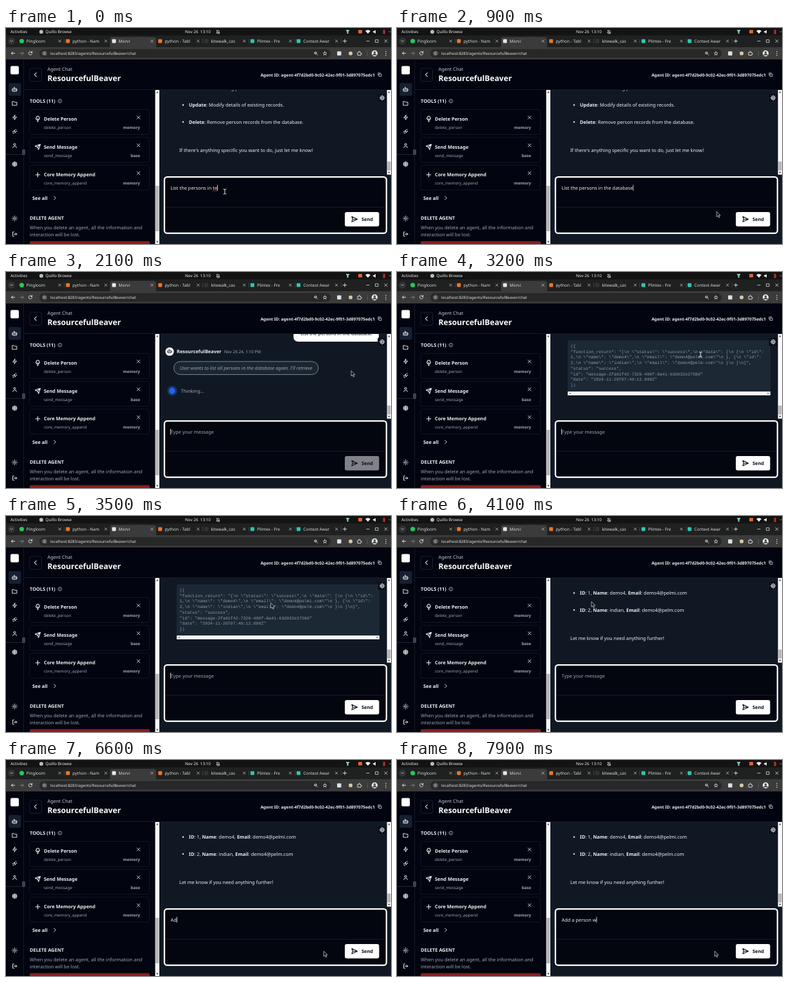
Recreate the animation shown at these times as an HTML page. Size 600 by 338 pixels, loop 8 s.

```html
<!DOCTYPE html>
<html lang="en">
<head>
<meta charset="utf-8">
<title>Agent chat</title>
<style>
html, body { margin: 0; width: 100%; height: 100%; overflow: hidden; background: #02040f; }
svg { display: block; width: 100vw; height: 100vh; }
text { font: 7.43px "Noto Sans", sans-serif; fill: #eceff3; white-space: pre; text-rendering: geometricPrecision; }
.b { font-weight: 700; }
.small { font-size: 6.4px; }
.dim { fill: #a0a7b4; }
.title { font-size: 12.2px; font-weight: 700; fill: #fff; }
.id { font-size: 6.48px; font-weight: 700; }
.end { text-anchor: end; }
.mid { text-anchor: middle; }
.bar { font-size: 6.3px; fill: #f2f2f2; }
.tab { font-size: 6.5px; fill: #dcdcdc; }
.url { font-size: 6.1px; fill: #e3e3e3; }
.code { font: 6.62px "Liberation Mono", monospace; fill: #8d99a8; }
.dark { fill: #0b0f19; }
.italic { font-style: italic; fill: #9aa3b0; }
.icon { fill: none; stroke-linecap: round; stroke-linejoin: round; }
</style>
</head>
<body>
<svg id="stage" viewBox="0 0 600 338"></svg>
<script>
const AGENT = 'ResourcefulBeaver';
const STAMP = 'Nov 26 24, 1:10 PM';

const text = (x, y, str, cls = '', attrs = '') => `<text x="${x}" y="${y}" class="${cls}" ${attrs}>${str}</text>`;
const rect = (x, y, w, h, fill, r = 0, stroke = 'none', sw = .6) =>
  `<rect x="${x}" y="${y}" width="${w}" height="${h}" rx="${r}" fill="${fill}" stroke="${stroke}" stroke-width="${sw}"/>`;
const circle = (x, y, r, fill, attrs = '') => `<circle cx="${x}" cy="${y}" r="${r}" fill="${fill}" ${attrs}/>`;

const ring = (cx, cy, r) => `M${cx - r} ${cy}a${r} ${r} 0 1 0 ${2 * r} 0a${r} ${r} 0 1 0 ${-2 * r} 0`;
const rays = (inner, outer) => [...Array(8)].map((_, i) => {
  const c = Math.cos(i * Math.PI / 4), s = Math.sin(i * Math.PI / 4);
  return `M${12 + inner * c} ${12 + inner * s}L${12 + outer * c} ${12 + outer * s}`;
}).join('');
const ICONS = {
  close: 'M5 5L19 19M19 5L5 19',
  right: 'M9 5L16 12L9 19',
  left: 'M15 5L8 12L15 19',
  down: 'M6 9L12 15L18 9',
  plus: 'M12 4V20M4 12H20',
  minus: 'M5 12H19',
  box: 'M5 5H19V19H5Z',
  bell: 'M4 18H20L18 15V10A6 6 0 0 0 6 10V15ZM10 22H14M4 3L20 21',
  bot: 'M4 9H20V20H4ZM12 9V4H8M1 14H4M20 14H23M9 13V16M15 13V16',
  folder: 'M3 4H9L12 7H21V20H3Z',
  zap: 'M13 2L4 14H12L11 22L20 10H12Z',
  flow: 'M3 13H8L11 6L14 18L17 11H21M15 4L19 4M5 19H9',
  user: ring(12, 7, 4) + 'M5 21V19A4 4 0 0 1 9 15H15A4 4 0 0 1 19 19V21',
  gear: ring(12, 12, 7) + ring(12, 12, 3) + rays(8, 11),
  wheel: ring(12, 12, 9) + ring(12, 12, 3) + rays(3, 9),
  sun: ring(12, 12, 4) + rays(8, 10.5),
  exit: 'M9 3H4V21H9M9 12H21M16 7L21 12L16 17',
  cone: 'M8 12L12 22L16 12ZM6 12A4 4 0 0 1 7 6A5 5 0 0 1 17 6A4 4 0 0 1 18 12Z',
  plane: 'M3 3L22 12L3 21L6 12ZM6 12H22',
  kite: 'M22 2L15 22L11 13L2 9ZM22 2L11 13',
  info: ring(12, 12, 10) + 'M12 11V17M12 7V7.5',
  copy: 'M9 9H21V21H9ZM5 15H3V3H15V5',
  back: 'M20 12H4M11 5L4 12L11 19',
  forward: 'M4 12H20M13 5L20 12L13 19',
  reload: 'M19 8A8 8 0 1 0 20 13M20 3V9H14',
  zoom: ring(10, 10, 6) + 'M15 15L21 21M7 10H13',
  star: 'M12 3L15 9L21 10L16.5 14L18 21L12 17L6 21L7.5 14L3 10L9 9Z',
  puzzle: 'M4 8H9V5A2 2 0 0 1 13 5V8H18V13H20A2 2 0 0 1 20 17H18V21H4Z'
};
// Icons are drawn on a 24 unit grid, centred on x, y.
const glyph = (name, x, y, size = 9, color = '#f1f3f6') =>
  `<path class="icon" d="${ICONS[name]}" stroke="${color}" stroke-width="2.5" transform="translate(${x - size / 2} ${y - size / 2}) scale(${size / 24})"/>`;

function topBar() {
  return rect(0, 0, 600, 12, '#131313') +
    text(7, 8.2, 'Activities', 'bar') + circle(55, 6, 3, '#b9bcc0') + text(61.5, 8.2, 'Quillo Browse', 'bar') +
    text(299, 8.2, 'Nov 26  13:10', 'bar mid') + glyph('bell', 330.5, 6, 7) +
    '<path d="M529.5 3H535.5L533.5 6V9H531.5V6Z" fill="#8fd0c4"/>' + rect(549, 3, 6, 5.5, '#d9653b', 1) +
    '<path d="M560 4.5Q564 1.5 568 4.5L564 9Z M572 5H573.5L576 3V9L573.5 7H572Z" fill="#eee"/>' +
    rect(587.5, 2.8, 3.4, 6.6, '#b3282d', .6) + glyph('down', 598, 6, 5);
}

function browser() {
  const tabs = [
    ['Pingloom', '#25c55f'], ['python - Nam', '#e8772e'], ['Morvi', '#e8e8e8'], ['python - Tabl', '#e8772e'],
    ['kitewalk_cas', '#303235'], ['Plintex - Fre', '#2cc7ae'], ['Context Awar', '#2cc7ae']
  ];
  return rect(0, 11.5, 600, 19, '#1f2020') + rect(0, 30, 600, 19.5, '#3b3b3b') +
    circle(8.5, 20.5, 5.5, '#323334') + glyph('down', 8.5, 20.5, 7) +
    rect(162, 14, 72, 18, '#3b3b3b', 4) +
    tabs.map(([name, color], i) => {
      const x = 24.5 + i * 71.9;
      const mark = i == 0 || i == 4 ? circle(x, 20.5, 3.6, color) : rect(x - 3, 17.5, 6, 6, color, 1);
      return mark + text(x + 7.3, 22.8, name, 'tab') + glyph('close', x + 59.2, 20.5, 6) +
        (i == 1 || i == 2 ? '' : rect(x + 66, 17, .6, 7, '#55585a'));
    }).join('') +
    glyph('plus', 528, 20.5, 8) + glyph('minus', 564, 20.5, 7) + glyph('box', 578, 20.5, 7) + glyph('close', 592, 20.5, 7) +
    glyph('back', 11, 39.5, 8) + glyph('forward', 24.5, 39.5, 8, '#8a8a8a') + glyph('reload', 38, 39.5, 8) +
    rect(52, 33, 454, 13.5, '#282828', 6.7) + circle(60, 39.7, 4.7, '#3c3c3c') + glyph('info', 60, 39.7, 5.5) +
    text(69, 41.8, `localhost:8283/agents/${AGENT}/chat`, 'url') +
    glyph('zoom', 483, 39.7, 7) + glyph('star', 497, 39.7, 7) +
    rect(516, 36.5, 6.5, 6.5, '#dcdfe3', 1) + circle(537, 39.7, 3, '#d8c6a8') + glyph('puzzle', 551, 39.5, 8) +
    rect(563, 36, .6, 8, '#66696c') + circle(574.5, 39.7, 4.7, '#e8eaec') +
    '<path d="M571 42.8A3.6 3.6 0 0 1 578 42.8ZM572.7 38.2a1.8 1.8 0 1 0 3.6 0a1.8 1.8 0 1 0 -3.6 0" fill="#4a4d52"/>' +
    [-3, 0, 3].map(d => circle(592, 39.7 + d, .8, '#e3e3e3')).join('');
}

function sidebar() {
  const items = [['bot', 96], ['folder', 118], ['zap', 140], ['flow', 162], ['user', 184], ['wheel', 213], ['sun', 298], ['exit', 322.5]];
  return rect(0, 49.5, 600, 289, '#02040f') + rect(4, 86, 19.5, 20, '#172030', 3) +
    rect(27.3, 49.5, .7, 289, '#1c2433') + rect(0, 197.5, 27.5, .8, '#2a3342') + rect(7, 59.5, 13, 13, '#fff', 2) +
    items.map(([name, y]) => glyph(name, 13.5, y, 9)).join('') +
    rect(25, 190, 5, 8.5, '#3b4453', 1.2);
}

function header() {
  return rect(37, 63, 18.5, 20.5, 'none', 3, '#2a3445') + glyph('left', 46, 73, 10) +
    text(64.5, 67, 'Agent Chat', '', 'style="fill:#c3c8d0"') + text(64.5, 83, AGENT, 'title') +
    text(575, 75.5, 'Agent ID: agent-4f7d2bd0-9c02-42ec-9f01-3d897075edc1', 'id end') + glyph('copy', 582.5, 73, 7) +
    rect(28, 96.3, 572, .7, '#1c2433');
}

function scrollbar(x, w, bottom, thumbTop, thumbBottom) {
  const c = x + w / 2;
  return rect(x, 97, w, bottom - 97, '#fafafa') + rect(x + .5, thumbTop, w - 1, thumbBottom - thumbTop, '#b8b8b8') +
    `<path d="M${c} 99l1.7 2.5h-3.4zM${c} ${bottom - 2}l1.7 -2.5h-3.4z" fill="#444"/>`;
}

function toolPanel() {
  const tools = [['cone', 'Delete Person', 'delete_person', 'memory'], ['kite', 'Send Message', 'send_message', 'base'],
    ['plus', 'Core Memory Append', 'core_memory_append', 'memory']];
  return text(37, 116.8, 'TOOLS (11)', 'b') + glyph('info', 84, 114.2, 7, '#b9c0ca') +
    tools.map(([mark, name, code, kind], i) => `<g transform="translate(0 ${i * 43.6})">` +
      rect(37, 127.5, 186.5, 39, 'none', 3, '#1d2534') + glyph(mark, 49.5, 142.5, 10) + text(59, 145.2, name, 'b') +
      text(59, 158, code, 'small dim') + text(209, 158, kind, 'small b dim end') + glyph('close', 206.5, 140, 8) + '</g>').join('') +
    text(41, 269, 'See all', 'b') + glyph('right', 76, 266, 9) +
    text(37, 299.5, 'DELETE AGENT', 'b') +
    text(37, 315, 'When you delete an agent, all the information and', 'dim') +
    text(37, 325.5, 'interaction will be lost.', 'dim') +
    rect(37, 333.5, 187, 8, '#8d1c1c', 2) + scrollbar(232.5, 6.6, 338, 247, 318);
}

const bullet = (y, html) => circle(276, y - 2.5, 1.2, '#eceff3') + text(285, y, html);
const bold = str => `<tspan class="b">${str}</tspan>`;
const person = (y, id, name, email) => bullet(y, `${bold('ID')}: ${id}, ${bold('Name')}: ${name}, ${bold('Email')}: ${email}`);

const resultLines = [
  '({',
  String.raw`"function_return": "{\n \"status\": \"success\",\n \"data\": [\n {\n \"id\":`,
  String.raw`1,\n \"name\": \"demo4\",\n \"email\": \"demo4@pelmi.com\"\n }, {\n \"id\":`,
  String.raw`2,\n \"name\": \"indian\",\n \"email\": \"demo4@pelm.com\"\n }\n ]\n}",`,
  '"status": "success",',
  '"id": "message-2fa61f42-7326-490f-9a41-63d932e2759d"',
  '"date": "2024-11-26T07:40:12.000Z"',
  '})'
];

function chat() {
  return rect(239, 97, 361, 241, '#101923') +
    '<clipPath id="view"><rect x="240" y="97" width="354" height="133"/></clipPath><g clip-path="url(#view)">' +
    '<g id="earlier">' + bullet(96.5, bold('Read') + ': Show existing person records.') +
    bullet(123, bold('Update') + ': Modify details of existing records.') +
    bullet(149.5, bold('Delete') + ': Remove person records from the database.') +
    text(270, 194, "If there's anything specific you want to do, just let me know!") + '</g>' +
    '<g id="sent">' + text(577, 134.5, STAMP, 'small dim end') +
    '<path d="M456 139.5H573Q581 139.5 581 147.5V165H456Q448 165 448 157V147.5Q448 139.5 456 139.5Z" fill="#fff"/>' +
    text(459, 154.6, 'List the persons in the database', 'dark') + '</g>' +
    '<g id="reply">' + circle(255, 124.5, 6.6, '#fff') + glyph('bot', 255, 124, 7.5, '#10151f') +
    text(266, 127.2, AGENT, 'b') + text(340, 127, STAMP, 'small dim') +
    '<rect id="thoughtBox" x="261.5" y="140" height="20.5" rx="10.2" fill="#1b2632" stroke="#aab1bb" stroke-width=".7"/>' +
    text(271, 153.3, '', 'italic', 'id="thought"') + '</g>' +
    '<g id="thinking">' + circle(259, 186, 4.7, '#2563eb', 'id="pulse"') + circle(259, 186, 4.7, '#2563eb') +
    text(272.5, 188.7, 'Thinking...', 'dim') + '</g>' +
    '<g id="result">' + rect(266, 107, 316, 81, '#1d2835', 3) +
    resultLines.map((line, i) => text(270.5, 117.8 + i * 8.75, line, 'code')).join('') +
    rect(266, 187, 316, 6, '#fafafa') +
    '<path d="M268.5 190l2 -1.5v3zM579.5 190l-2 -1.5v3z" fill="#555"/></g>' +
    '<g id="answer">' + person(123, 1, 'demo4', 'demo4@pelmi.com') + person(149.5, 2, 'indian', 'demo4@pelm.com') +
    text(270, 194, 'Let me know if you need anything further!') + '</g></g>' +
    rect(579.5, 102.5, 13.5, 13.5, '#060a14', 2.5, '#1d2635') + glyph('gear', 586.2, 109.3, 9) +
    scrollbar(593.7, 6.3, 229.5, 209, 223);
}

function composer() {
  return rect(246.9, 233.1, 346, 88.1, '#03050f', 4.5, '#fff', 2.3) + rect(248.5, 280.3, 342.5, .7, '#1f2836') +
    text(256.5, 252.6, 'Type your message', 'dim', 'id="placeholder"') + text(256.5, 252.6, '', '', 'id="draft"') +
    '<path id="typo" class="icon" d="M322 255.2l1.2 -.8 1.2 .8 1.2 -.8 1.2 .8 1.2 -.8 1.2 .8" stroke="#e5484d" stroke-width=".7"/>' +
    '<rect id="caret" y="245.5" width=".8" height="9" fill="#fff"/>' +
    '<rect id="send" x="528" y="288" width="53.5" height="22.5" rx="3"/>' +
    glyph('plane', 543, 299.2, 11, '#0b0f19') + text(554, 301.9, 'Send', 'b dark');
}

const pointers =
  '<g id="arrow"><path d="M0 0V8.3L2 6.6L3.3 9.6L4.7 9L3.4 6.1H6Z" fill="#111" stroke="#fff" stroke-width=".6"/></g>' +
  '<g id="beam"><path class="icon" d="M-2 -4Q0 -4 0 -3V3Q0 4 -2 4M2 -4Q0 -4 0 -3M0 3Q0 4 2 4" stroke="#fff" stroke-width=".9"/></g>' +
  '<g id="hand"><path d="M-1.5 -4.5Q-.5 -5 0 -4V-1L3 -.3Q4 0 3.8 1.2L3 4H-1.3L-3.5 .8Q-3.3 -.3 -1.5 1Z" fill="#111" stroke="#fff" stroke-width=".6"/></g>';

document.getElementById('stage').innerHTML =
  topBar() + browser() + sidebar() + header() + toolPanel() + chat() + composer() + pointers;

const $ = id => document.getElementById(id);
const show = (id, on) => { $(id).style.display = on ? '' : 'none'; };
const shift = (id, dy) => $(id).setAttribute('transform', `translate(0 ${dy})`);
const between = (t, a, b) => t >= a && t < b;

const SENT = 1000, REPLY = 1900, RESULT = 2700, ANSWER = 3700;
const thought = "User wants to list all persons in the database again. I'll retrieve the records.";
const nextDraft = 'Add a person w';
const keyTimes = [6500, 6600, 6800, 7100, 7200, 7400, 7500, 7500, 7600, 7600, 7700, 7800, 7800, 7900];
const path = [
  [0, 341, 256], [700, 341, 256], [1000, 553, 298], [1400, 533, 143], [2100, 538, 154.5], [2700, 530, 150],
  [3200, 473, 129], [3700, 380, 140], [4100, 303, 134], [4600, 312, 146], [5200, 386, 154], [5400, 440, 212], [5900, 495, 299], [8000, 495, 299]
];

function pointerAt(t) {
  const i = path.findIndex(p => p[0] > t);
  const [t0, x0, y0] = path[i - 1], [t1, x1, y1] = path[i];
  const u = (t - t0) / (t1 - t0), k = u * u * (3 - 2 * u);
  return [x0 + (x1 - x0) * k, y0 + (y1 - y0) * k];
}

function draftAt(t) {
  if (t >= SENT) return nextDraft.slice(0, keyTimes.filter(k => k <= t).length);
  return 'List the persons in ' + (t < 100 ? 'te' : 'the database'.slice(0, 1 + (t - 100) / 50));
}

function render(t) {
  show('earlier', t < REPLY);
  shift('earlier', t < SENT ? 0 : -78.5);
  show('sent', between(t, SENT, RESULT));
  shift('sent', t < REPLY ? 0 : -56);
  show('thinking', between(t, SENT, RESULT));
  show('reply', between(t, REPLY, RESULT));
  show('result', between(t, RESULT, ANSWER));
  show('answer', t >= ANSWER);

  if (between(t, REPLY, RESULT)) {
    const end = thought.indexOf(' the records');
    $('thought').textContent = thought.slice(0, Math.max(18, Math.round(end + (t - 2100) * .12)));
    $('thoughtBox').setAttribute('width', $('thought').getComputedTextLength() + 19);
  }
  const ping = 1 - (1 - Math.min(1, (t + 200) % 1000 / 750)) ** 2;
  $('pulse').setAttribute('r', 4.7 * (1 + ping));
  $('pulse').setAttribute('opacity', 1 - ping);

  const draft = draftAt(t);
  $('draft').textContent = draft;
  show('placeholder', !draft);
  show('typo', t < 100);
  const blink = (t < 2500 ? t : t + 800) % 1000 < 500;
  show('caret', draft || blink);
  $('caret').setAttribute('x', 256.2 + (draft ? $('draft').getComputedTextLength() + .3 : 0));
  $('send').setAttribute('fill', between(t, SENT, RESULT) ? '#808288' : '#fff');

  const kind = t < 800 || between(t, 3000, 3500) ? 'beam' : between(t, 5000, 5300) ? 'hand' : 'arrow';
  const [x, y] = pointerAt(t);
  for (const id of ['arrow', 'beam', 'hand']) {
    show(id, id === kind);
    $(id).setAttribute('transform', `translate(${x} ${y})`);
  }
}

const start = performance.now();
function tick() {
  const t = (performance.now() - start) % 8000;
  render(Math.floor(t / 100) * 100);
  requestAnimationFrame(tick);
}
tick();
</script>
</body>
</html>
```
